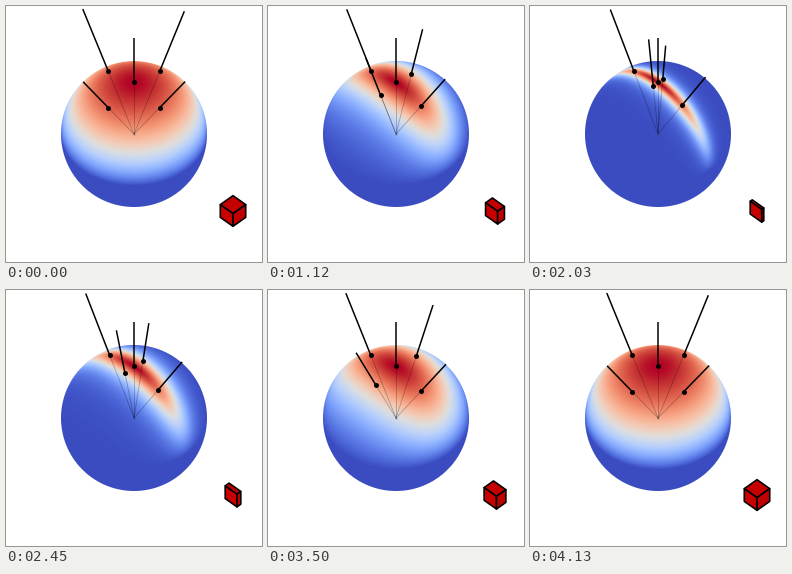
Write a matplotlib script that moves like this. It is 256x256 px and loops after 4200 ms.

```python
import numpy as np
import matplotlib.pyplot as plt
from matplotlib.animation import FuncAnimation
from matplotlib.patches import Polygon

SIZE, DPI = 256, 100
STEPS = 30
CENTER = np.array([128.0, 128.0])
RADIUS = 73.0
CUBE_CENTER = np.array([227.0, 205.0])
CUBE_SIDE = 18.0
H = np.sqrt(0.5)

# Orthographic view, 45 degrees above the ground and turned by 45 degrees
RIGHT = np.array([H, H, 0])
UP = np.array([0.5, -0.5, H])
TOWARD = np.array([-0.5, 0.5, H])


def px(width):
    return width * 72 / DPI


def project(p):
    return np.array([p @ RIGHT, -(p @ UP)])


def unit(v):
    return v / np.linalg.norm(v)


# Surface normals of the visible half of the sphere, per pixel
grid = (np.arange(SIZE) + 0.5 - 128) / RADIUS
gx, gy = np.meshgrid(grid, -grid)
rr = np.hypot(gx, gy)
clip = np.maximum(rr, 1)
depth = np.sqrt(np.maximum(0, 1 - rr**2))
normals = ((gx / clip)[..., None] * RIGHT + (gy / clip)[..., None] * UP
           + depth[..., None] * TOWARD)
coverage = np.clip((1 - rr) * RADIUS + 0.5, 0, 1)


def scales(step):
    k = step / (STEPS - 1)
    return np.array([1 - 0.84 * k, 1 - 0.09 * k, 1.0])


def sphere_image(m):
    """Linearly transformed clamped cosine, scaled to 1 at the pole."""
    w = normals / m
    value = np.maximum(normals[..., 2], 0) / np.sum(w**2, axis=-1) ** 2
    rgba = plt.cm.coolwarm(np.clip(value, 0, 1))
    rgba[..., 3] = coverage
    return rgba


tilt = np.radians(30)
s, c = np.sin(tilt), np.cos(tilt)
RAYS = np.array([[0, 0, 1], [s, 0, c], [-s, 0, c], [0, s, c], [0, -s, c]])


def ray_lengths(step):
    back = 1.95 - 0.0145 * step + 0.0001 * step**2
    return [1.865, back, 1.97, 1.98, 1.985]


def cube_faces(m):
    x, y, z = np.diag(m * CUBE_SIDE / 2)
    faces = [(z, x, y), (-x, y, z), (y, x, z)]
    return [[CUBE_CENTER + project(n + i * a + j * b)
             for i, j in ((-1, -1), (1, -1), (1, 1), (-1, 1))]
            for n, a, b in faces]


fig = plt.figure(figsize=(SIZE / DPI, SIZE / DPI), dpi=DPI, facecolor="white")
ax = fig.add_axes([0, 0, 1, 1])
ax.axis("off")

ball = ax.imshow(sphere_image(scales(0)), extent=(0, SIZE, SIZE, 0),
                 interpolation="nearest", zorder=1)
ax.set(xlim=(0, SIZE), ylim=(SIZE, 0))
inner = [ax.plot([], [], color="black", lw=px(0.8), alpha=0.28, zorder=2)[0]
         for _ in RAYS]
outer = [ax.plot([], [], color="black", lw=px(1.5), zorder=3,
                 solid_capstyle="butt")[0] for _ in RAYS]
dots, = ax.plot([], [], "o", color="black", ms=px(5), mew=0, zorder=4)
ax.plot(*CENTER, "o", color="#555555", ms=px(1.8), mew=0, alpha=0.6, zorder=2)
faces = [ax.add_patch(Polygon(np.zeros((4, 2)), fc=color, ec="black",
                              lw=px(1.6), joinstyle="round", zorder=5))
         for color in ("#c40000", "#c80000", "#c00000")]


def update(frame):
    step = min(frame, 2 * STEPS - 1 - frame)
    m = scales(step)
    ball.set_data(sphere_image(m))
    points = []
    for ray, length, a, b in zip(RAYS, ray_lengths(step), inner, outer):
        offset = RADIUS * project(unit(ray * m))
        foot, tip = CENTER + offset, CENTER + length * offset
        a.set_data(*zip(CENTER, foot))
        b.set_data(*zip(foot, tip))
        points.append(foot)
    dots.set_data(*zip(*points))
    for patch, corners in zip(faces, cube_faces(m)):
        patch.set_xy(corners)
    return [ball, *inner, *outer, dots, *faces]


anim = FuncAnimation(fig, update, frames=2 * STEPS, interval=70,
                     init_func=lambda: update(0), repeat=True, repeat_delay=0)
plt.show()
```
